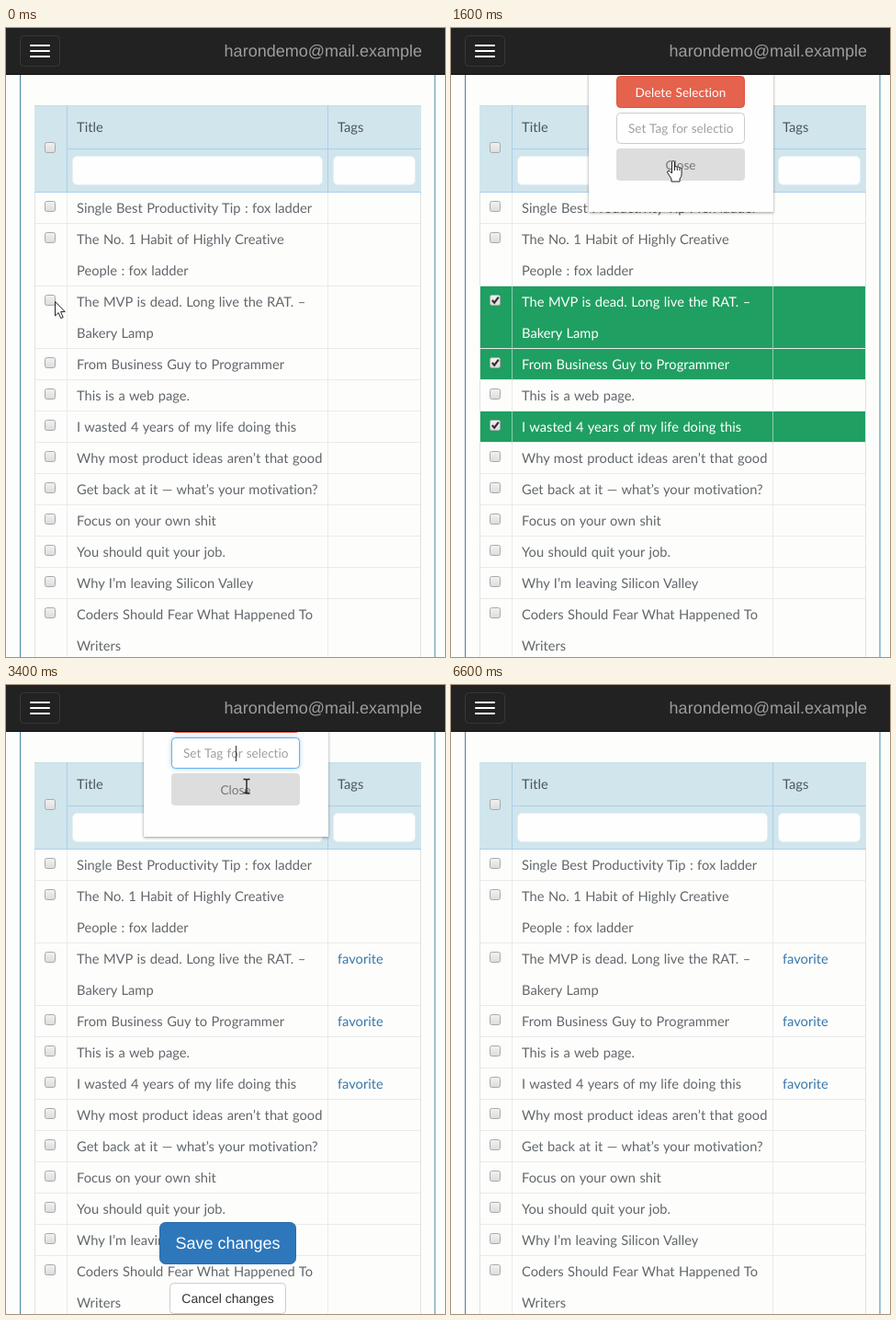
Write an HTML page that moves like this. It is 478 px wide and 684 px high and loops after 7.4 s.

```html
<!DOCTYPE html>
<html lang="en">
<head>
<meta charset="utf-8">
<title>Bulk tagging</title>
<style>
html, body { margin: 0; width: 100%; height: 100%; overflow: hidden; background: #fdfefc; }
svg { display: block; font: 14.7px Lato, "Noto Sans", sans-serif; word-spacing: .7px; font-variant-ligatures: none; text-rendering: geometricPrecision; }
.ui { font-family: "Liberation Sans", Arial, sans-serif; word-spacing: 0; }
.small { font-size: 13.6px; }
</style>
</head>
<body>
<svg id="stage" width="478" height="684" viewBox="0 0 478 684">
  <defs>
    <linearGradient id="box" x2="0" y2="1"><stop stop-color="#f2f2f2"/><stop offset="1" stop-color="#dcdcdc"/></linearGradient>
    <filter id="shadow" x="-10%" y="-10%" width="120%" height="120%"><feDropShadow dx="0" dy="1" stdDeviation="1.5" flood-opacity=".4"/></filter>
    <filter id="glow" x="-10%" y="-30%" width="120%" height="160%"><feDropShadow dx="0" dy="0" stdDeviation="2" flood-color="#66afe9" flood-opacity=".6"/></filter>
    <clipPath id="field"><rect x="190" y="93" width="117" height="32"/></clipPath>
  </defs>
  <g id="scene"></g>
</svg>
<script>
const LOOP = 7400, STEP = 200;
const rows = [
  ['Single Best Productivity Tip : fox ladder'],
  ['The No. 1 Habit of Highly Creative', 'People : fox ladder'],
  ['The MVP is dead. Long live the RAT. –', 'Bakery Lamp'],
  ['From Business Guy to Programmer'],
  ['This is a web page.'],
  ['I wasted 4 years of my life doing this'],
  ['Why most product ideas aren’t that good'],
  ['Get back at it — what’s your motivation?'],
  ['Focus on your own shit'],
  ['You should quit your job.'],
  ['Why I’m leaving Silicon Valley'],
  ['Coders Should Fear What Happened To', 'Writers']
];
const checkTimes = { 2: 200, 3: 800, 5: 1200 };
const TAGGED = 3400, SAVED = 5600;

// time, x, y of the pointer tip
const path = [
  [0, 53, 297], [200, 53, 297], [600, 51, 367], [800, 51, 367], [1000, 51, 434], [1200, 51, 434],
  [1600, 242, 144], [1800, 262, 110], [4000, 262, 110], [4200, 259, 200], [4600, 246, 610],
  [5600, 246, 610], [6400, 240, 700], [LOOP, 240, 700]
];
// time, popup offset
const slide = [[0, -170], [200, -90], [400, 0], [3200, 0], [3400, -35], [3600, -115], [3800, -170], [LOOP, -170]];

function at(keys, t) {
  const i = keys.findIndex(k => k[0] > t), a = keys[i - 1], b = keys[i];
  const p = (t - a[0]) / (b[0] - a[0]);
  return a.slice(1).map((v, j) => v + (b[j + 1] - v) * p);
}

const rect = (x, y, w, h, fill, more = '') =>
  `<rect x="${x}" y="${y}" width="${w}" height="${h}" fill="${fill}" ${more}/>`;
const framed = (x, y, w, h, fill, stroke, r, more = '') =>
  rect(x + .5, y + .5, w - 1, h - 1, fill, `stroke="${stroke}" rx="${r}" ${more}`);
const text = (x, y, s, fill, more = '') => `<text x="${x}" y="${y}" fill="${fill}" ${more}>${s}</text>`;
const mid = 'text-anchor="middle"';

function checkbox(y, on) {
  return framed(42, y, 12, 12, 'url(#box)', '#a9a9a9', 2) +
    (on ? `<path d="M44.8 ${y + 6}l2.4 2.7 4.6-6" fill="none" stroke="#333" stroke-width="2.2"/>` : '');
}

function table(t) {
  let s = rect(31, 84, 421, 95, '#d1e5ed') + rect(31, 84, 421, 1, '#c6dde8') +
    rect(66, 84, 1, 95, '#abcfe8') + rect(350, 84, 1, 95, '#abcfe8') +
    rect(66, 131, 386, 1, '#abcfe8') + rect(31, 178, 421, 1, '#abcfe8') +
    text(77, 113, 'Title', '#4c5661') + text(361, 113, 'Tags', '#4c5661') +
    framed(72, 139, 273, 32, '#fefefe', '#e4f0f4', 5) + framed(356, 139, 90, 32, '#fefefe', '#e4f0f4', 5) +
    checkbox(124);
  let y = 179;
  rows.forEach((lines, i) => {
    const h = 34 * lines.length, marked = i in checkTimes;
    const on = marked && t >= checkTimes[i] && t < TAGGED;
    if (on) s += rect(31, y, 421, h, '#1f9f61');
    s += rect(31, y + h - 1, 421, 1, '#e9ebea');
    for (const x of [66, 350]) s += rect(x, y, 1, h, on ? '#8fcfb0' : '#e9ebea');
    for (const x of [31, 451]) s += rect(x, y, 1, h, '#dfe3e3');
    s += checkbox(y + 9, on);
    lines.forEach((l, j) => s += text(77, y + 22 + 34 * j, l, on ? '#fff' : '#62676a'));
    if (marked && t >= TAGGED) s += text(361, y + 22, 'favorite', '#3a78ac');
    y += h;
  });
  return s;
}

function popup(t) {
  const [dy] = at(slide, t);
  if (dy <= -160) return '';
  const focus = t >= 2000;
  const typed = t < TAGGED ? 'favorite'.slice(0, Math.max(0, Math.round((t - 2000) / 600 * 8))) : '';
  return `<g class="small" transform="translate(0 ${dy})">` +
    rect(150, 0, 201, 200, '#fdfefd', 'filter="url(#shadow)"') +
    framed(180, 52, 140, 35, '#e5624c', '#dc5640', 4) + text(250, 75, 'Delete Selection', '#fff', mid) +
    framed(180, 92, 140, 34, '#fff', focus ? '#66afe9' : '#ccc', 4, focus ? 'filter="url(#glow)"' : '') +
    (typed ? text(250, 114, typed, '#666', mid)
      : text(193, 114, 'Set Tag for selection', '#a0a0a0', 'clip-path="url(#field)"')) +
    (focus && !typed ? rect(250, 101, 1, 17, '#333') : '') +
    rect(180, 131, 140, 35, '#dcdddc', 'rx="4"') + text(250, 154, 'Close', '#777', mid) + '</g>';
}

function buttons(t) {
  if (t < TAGGED || t >= SAVED) return '';
  const hover = t >= 4600;
  return '<g class="ui">' +
    framed(167, 584, 149, 46, hover ? '#235c92' : '#2e77bb', hover ? '#1d4f7e' : '#2b6dab', 6) +
    text(241.5, 613, 'Save changes', '#fff', mid + ' font-size="18"') +
    framed(178, 650, 127, 34, '#fff', '#ccc', 4) +
    text(241.5, 672, 'Cancel changes', '#333', mid + ' font-size="14"') + '</g>';
}

function navbar() {
  return rect(0, 0, 478, 51, '#222') + rect(0, 50, 478, 1, '#101010') +
    framed(15, 8, 44, 34, 'none', '#383838', 4) +
    [18, 24, 30].map(y => rect(26, y, 22, 2, '#fff', 'rx="1"')).join('') +
    text(453, 31, 'harondemo@mail.example', '#9d9d9d', 'class="ui" font-size="18" text-anchor="end"');
}

const shapes = {
  arrow: '<path d="M.5 .5V16l3.6-3.4 2.6 6 2.5-1-2.6-6h4.6z" fill="#fff" stroke="#222"/>',
  hand: '<path d="M-1.5 11V1.5q1.5-2 3 0V7q1.5-1.2 2.8 .3 1.6-.8 2.6 .6 1.9-.5 2.2 1.4V15q0 3-2 5v3H-2v-3l-4.5-7q0-2.5 2.5-1.5l2.5 2.5zM1.5 7v4M4.3 7.5V11M6.9 8.2V11" fill="#fff" stroke="#222" stroke-linejoin="round"/>',
  beam: '<path d="M-3.5-7.5H-1L0-6.5 1-7.5H3.5M0-6.5V6.5M-3.5 7.5H-1L0 6.5 1 7.5H3.5" fill="none" stroke="#222" stroke-width="1.4"/>'
};

function pointer(t) {
  const [x, y] = at(path, t);
  const kind = t >= 1800 && t <= 3400 ? 'beam' : t === 1600 || t >= 4600 && t < SAVED ? 'hand' : 'arrow';
  return `<g transform="translate(${x} ${y})">${shapes[kind]}</g>`;
}

const scene = document.getElementById('scene');
let shown = -1;
function draw() {
  const t = Math.floor(performance.now() % LOOP / STEP) * STEP;
  if (t !== shown) {
    shown = t;
    scene.innerHTML = rect(0, 0, 478, 684, '#fdfefc') +
      rect(15, 51, 1, 633, '#4683a3') + rect(466.5, 51, 1, 633, '#4683a3') +
      table(t) + popup(t) + buttons(t) + navbar() + pointer(t);
  }
  requestAnimationFrame(draw);
}
draw();
</script>
</body>
</html>
```
